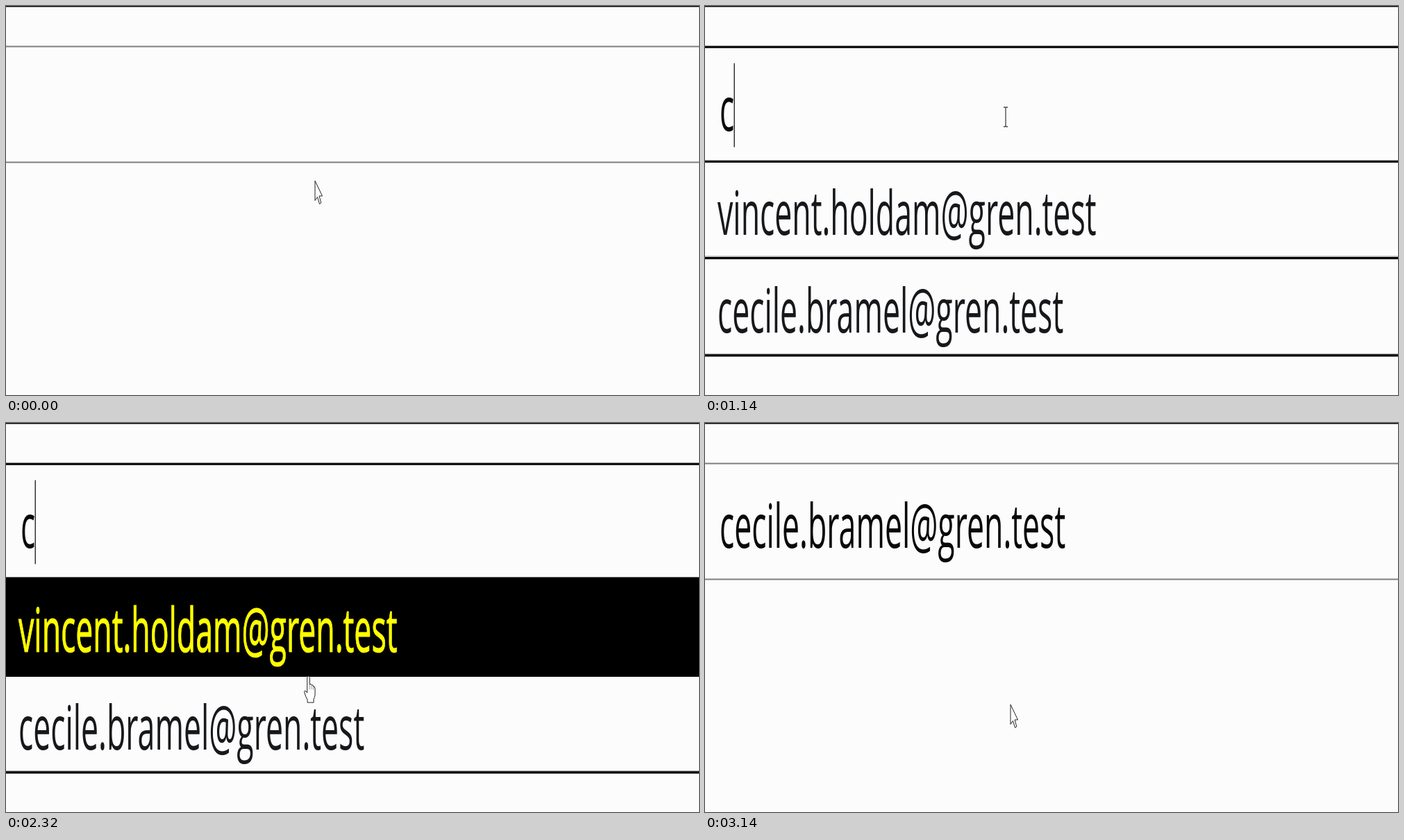
Write an HTML page that moves like this. It is 998 by 561 pixels and loops after 4.2 s.

```html
<!DOCTYPE html>
<html lang="en">
<head>
<meta charset="utf-8">
<title>Email suggestions</title>
<style>
  html, body { margin: 0; height: 100%; overflow: hidden; background: #fcfcfc; }
  svg { display: block; width: 998px; height: 561px; }
  text { font: 88px "Open Sans", "Noto Sans", sans-serif; fill: #16181b; }
  #value { fill: #080808; }
  .row.active rect { fill: #000; }
  .row rect { fill: none; }
  .row.active text { fill: #ff0; stroke: #ff0; stroke-width: 1.2; }
  .pointer path { fill: #fff; stroke: #222; }
</style>
</head>
<body>
<svg viewBox="0 0 998 561">
  <rect width="998" height="561" fill="#fcfcfc"/>
  <rect width="998" height="1.4"/>
  <g id="blurred">
    <path d="M0 58.4H998M0 225.4H998" stroke="#c4c4c4" stroke-width="3"/>
    <path d="M0 58.4H998M0 225.4H998" stroke="#808080" stroke-width="1.4"/>
  </g>
  <g id="focused">
    <path d="M0 57.2H998M0 222.4H998" stroke="#bbb"/>
    <rect y="57.7" width="998" height="3"/>
    <rect y="222.9" width="998" height="3"/>
  </g>
  <g id="list">
    <path d="M0 360.7H998M0 501.4H998" stroke="#bbb"/>
    <rect y="361.8" width="998" height="3.4"/>
    <rect y="502.2" width="998" height="3.4"/>
    <g class="row">
      <rect y="222.5" width="998" height="143.5"/>
      <text transform="translate(18 330) scale(.507 1)">vincent.holdam@gren.test</text>
    </g>
    <g class="row">
      <rect y="361" width="998" height="145"/>
      <text transform="translate(18 470.5) scale(.507 1)">cecile.bramel@gren.test</text>
    </g>
  </g>
  <text id="value" transform="translate(21 180) scale(.507 1)"></text>
  <rect id="caret" y="82.5" width="1.2" height="121"/>
  <g id="arrow" class="pointer">
    <path d="M0 0V28.5L3.5 23.5 6.5 33.5 8.8 32 6.1 22H10.5Z"/>
  </g>
  <g id="beam" class="pointer">
    <path d="M-3-14H-1L0-13 1-14H3M0-13V13M-3 14H-1L0 13 1 14H3" style="fill:none;stroke:#444;stroke-width:1.3"/>
  </g>
  <g id="hand" class="pointer">
    <path d="M-1.8 2Q0-2 1.8 2V12Q3.5 10 4.6 13Q6.3 11.5 7.2 15Q9.3 14 9.5 18V27Q9 31 7.5 33V38H-1.5V34Q-4 30-6 23Q-5.5 19.5-3.3 22L-1.8 24Z"/>
    <path d="M1.8 12V19M4.6 13V19M7.2 15V20" style="stroke:#555;stroke-width:.6"/>
  </g>
</svg>
<script>
const LOOP = 4200, BLINK = 530;
const FOCUS = 240, TYPED = 1140, HOVER_FIRST = 1980, HOVER_SECOND = 2340, PRESS = 2980, PICK = 3100;

// Pointer positions: time, x, y
const path = [
  [20, 445, 252], [220, 433, 160], [1800, 433, 160], [1960, 430, 237],
  [2120, 431, 292], [2340, 436, 372], [2700, 440, 408], [PICK, 440, 408], [3140, 440, 406]
];

const $ = id => document.getElementById(id);
const rows = document.querySelectorAll('.row');
const show = (id, on) => { $(id).style.display = on ? '' : 'none'; };

function pointerAt(t) {
  const next = path.findIndex(p => p[0] > t);
  if (next === 0) return path[0].slice(1);
  if (next < 0) return path.at(-1).slice(1);
  const [t0, x0, y0] = path[next - 1], [t1, x1, y1] = path[next];
  let k = (t - t0) / (t1 - t0);
  if (t0 === HOVER_SECOND) k = 1 - (1 - k) ** 2;
  return [x0 + (x1 - x0) * k, y0 + (y1 - y0) * k];
}

function draw(t) {
  const hasFocus = t >= FOCUS && t < PRESS;
  const open = t >= TYPED && t < PICK;
  show('focused', hasFocus);
  show('blurred', !hasFocus);
  show('list', open);
  rows[0].classList.toggle('active', t >= HOVER_FIRST && t < HOVER_SECOND);
  rows[1].classList.toggle('active', t >= HOVER_SECOND);

  $('value').textContent = t < TYPED ? '' : open ? 'c' : rows[1].textContent.trim();
  const blinkStart = t < TYPED ? FOCUS : TYPED;
  show('caret', hasFocus && Math.floor((t - blinkStart) / BLINK) % 2 === 0);
  $('caret').setAttribute('x', t < TYPED ? 21.5 : 41.6);

  const [x, y] = pointerAt(t);
  const shape = t >= HOVER_FIRST && t < PICK ? 'hand' : y > 226 && t < TYPED || t >= PICK ? 'arrow' : 'beam';
  for (const id of ['arrow', 'beam', 'hand']) show(id, id === shape);
  $(shape).setAttribute('transform', `translate(${x} ${y})`);
}

function tick() {
  draw(performance.now() % LOOP);
  requestAnimationFrame(tick);
}
tick();
</script>
</body>
</html>
```
